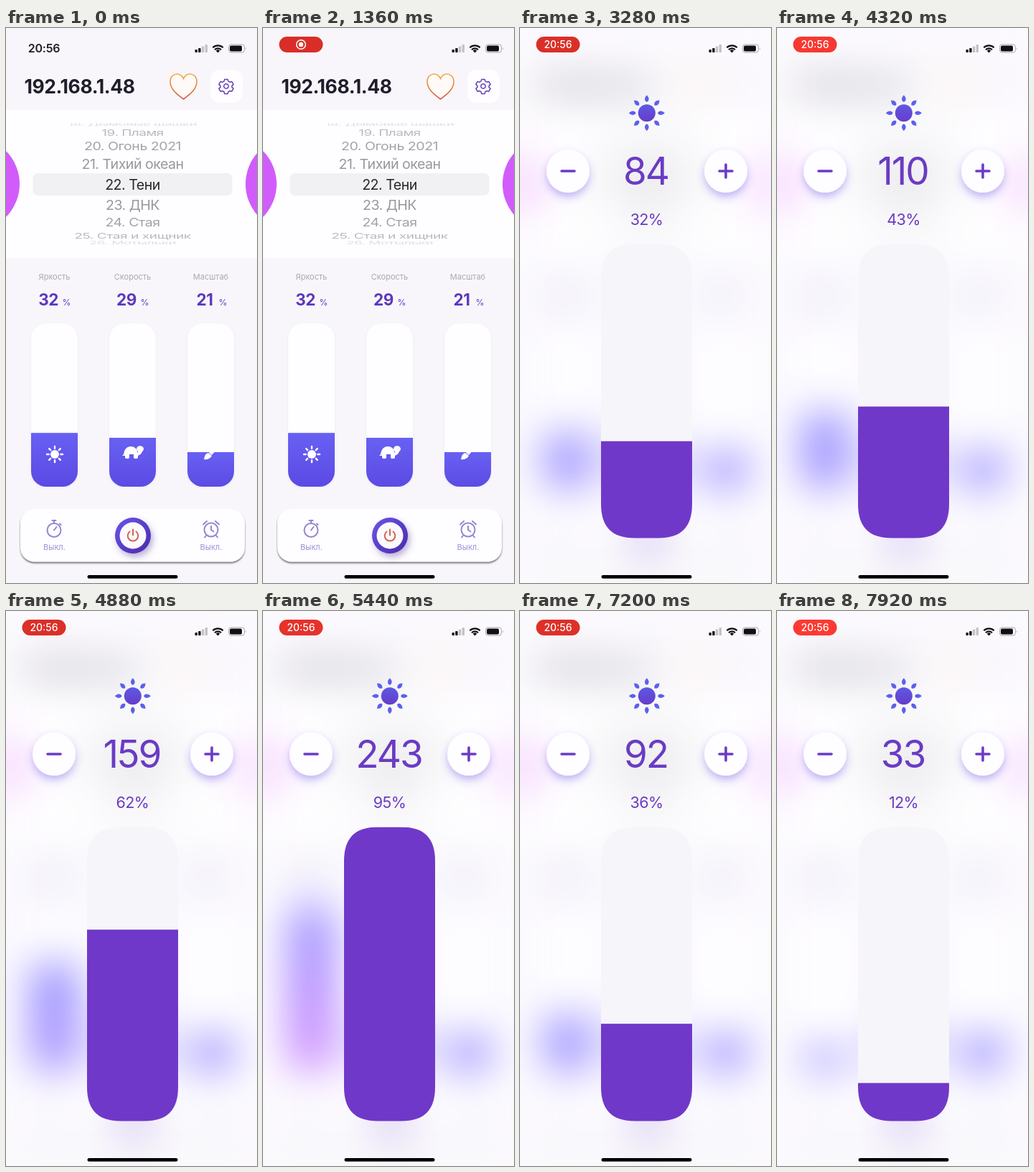
Write an HTML page that moves like this. It is 350 px wide and 772 px high and loops after 8 s.

```html
<!DOCTYPE html>
<html lang="ru">
<head>
<meta charset="utf-8">
<title>Lamp remote</title>
<style>
html, body { margin: 0; width: 100%; height: 100%; overflow: hidden; background: #f9f7fc; }
#stage { position: relative; width: 350px; height: 772px; overflow: hidden; }
#stage > * { position: absolute; left: 0; top: 0; width: 350px; height: 772px; }
svg { display: block; overflow: hidden; }
text { font-family: Inter, Roboto, "Open Sans", sans-serif; text-anchor: middle; }
#veil { background: #fff; }
#panel { transform-origin: 176.5px 386px; }
</style>
</head>
<body>
<div id="stage">
  <svg id="main" viewBox="0 0 350 772"></svg>
  <div id="veil"></div>
  <svg id="panel" viewBox="0 0 350 772"></svg>
  <svg id="status" viewBox="0 0 350 772"></svg>
</div>
<script>
const $ = id => document.getElementById(id);
const clamp = x => Math.max(0, Math.min(1, x));
const LOOP = 8000, OPEN = 2200, OPEN_MS = 560, LAG = 60;

const text = (x, y, size, fill, str, extra = '') =>
  `<text x="${x}" y="${y}" font-size="${size}" fill="${fill}" ${extra}>${str}</text>`;
const ring = (n, shape) =>
  Array.from({ length: n }, (_, i) => `<g transform="rotate(${i * 360 / n})">${shape}</g>`).join('');

// y, vertical squash, horizontal scale, colour, label
const rows = [
  [134, .3, .96, '#dedde0', '18. Дымовые шашки'],
  [145.5, .62, .97, '#b9b8bc', '19. Пламя'],
  [164, .84, 1, '#a3a2a6', '20. Огонь 2021'],
  [189, .95, 1, '#98979b', '21. Тихий океан'],
  [217.5, 1, 1, '#29282c', '22. Тени'],
  [246, .95, 1, '#98979b', '23. ДНК'],
  [270.5, .84, 1, '#a3a2a6', '24. Стая'],
  [289, .56, .98, '#b9b8bc', '25. Стая и хищник'],
  [299, .3, .96, '#dedde0', '26. Мотыльки']
];
const wheel = rows.map(([y, sy, sx, fill, label]) =>
  `<g transform="translate(176.5 ${y}) scale(${sx} ${sy})">${text(0, 7, 19.6, fill, label, 'letter-spacing="-.5"')}</g>`).join('');

const sunIcon = `<g transform="translate(68 593)" fill="#fff"><circle r="6"/>
  ${ring(8, '<path d="M0-8.3V-11" stroke="#fff" stroke-width="2.4" stroke-linecap="round"/>')}</g>`;
const turtleIcon = `<g transform="translate(177 590)" fill="#fff">
  <path d="M-13 4q1-12 10.500-12q8 0 9.500 11h-19z"/>
  <ellipse cx="10" cy="-4.500" rx="5" ry="4.300"/><path d="M4 3q3-1 4-7l5 3q-2 6-9 6z"/>
  <rect x="-11" y="2" width="6" height="7" rx="2"/><rect x="1" y="2" width="6" height="7" rx="2"/>
  <path d="M-12 2l-3 3 5 0z"/></g>`;
const brushIcon = `<path fill="#fff" d="M276 600q1-8 6-9l5 4q-3 6-11 5zM283 591l8-9 4 3-8 9z"/>`;

const sliders = [
  [35, 'Яркость', 32, 563, sunIcon],
  [144, 'Скорость', 29, 570, turtleIcon],
  [253, 'Масштаб', 21, 590, brushIcon]
].map(([x, label, val, top, icon], i) => `
  ${text(x + 32.5, 350, 11, '#aaa7af', label)}
  ${text(x + 24, 386, 22.5, '#5d37bb', val, 'font-weight="700" letter-spacing="-.5"')}
  ${text(x + 49.5, 386, 12, '#6f4cc4', '%', 'font-weight="500"')}
  <rect x="${x}" y="411" width="65" height="227" rx="21" fill="#fefdff" filter="url(#soft)"/>
  <clipPath id="tube${i}"><rect x="${x}" y="411" width="65" height="227" rx="21"/></clipPath>
  <clipPath id="lit${i}"><rect id="litRect${i}" x="${x}" y="${top}" width="65" height="300"/></clipPath>
  <g clip-path="url(#tube${i})">
    <rect id="fill${i}" x="${x}" y="${top}" width="65" height="${638 - top}" fill="url(#bar${i ? '' : '0'})"/>
    <g clip-path="url(#lit${i})">${icon}</g>
  </g>`).join('');

const barStops = id => `<linearGradient id="${id}" x2="0" y2="1">
  <stop stop-color="#6860f3"/><stop id="${id}End" offset="1" stop-color="#5c4be3"/></linearGradient>`;

const gear = `<g transform="translate(307 81)" fill="none" stroke="#6440b8" stroke-width="1.500" stroke-linejoin="round">
  <path d="M-2.200-9h4.400l.8 2.700 2.200 1.200 2.700-.7 2.200 3.800-2 2v2l0 0 2 2-2.200 3.800-2.700-.7-2.200 1.200-.8 2.700h-4.400l-.8-2.700-2.200-1.200-2.700.7-2.200-3.800 2-2v-2l-2-2 2.200-3.800 2.700.7 2.200-1.200z" transform="translate(0 -.6)"/>
  <circle r="3.200"/></g>`;

$('main').innerHTML = `
<defs>
  ${barStops('bar')}${barStops('bar0')}
  <linearGradient id="love" x2="0" y2="1"><stop stop-color="#f0b04a"/><stop offset="1" stop-color="#cf5a3c"/></linearGradient>
  <linearGradient id="knob" x2="1" y2="1"><stop stop-color="#6a55ea"/><stop offset="1" stop-color="#4a2aa8"/></linearGradient>
  <filter id="soft" x="-20%" y="-20%" width="140%" height="140%"><feDropShadow dx="0" dy="1" stdDeviation="1.500" flood-color="#8070a0" flood-opacity=".12"/></filter>
  <filter id="lift" x="-20%" y="-30%" width="140%" height="170%"><feDropShadow dx="0" dy="2" stdDeviation="1" flood-color="#444" flood-opacity=".75"/></filter>
  <filter id="drop" x="-50%" y="-50%" width="200%" height="200%"><feDropShadow dx="3" dy="5" stdDeviation="4" flood-color="#5a45a0" flood-opacity=".4"/></filter>
  <clipPath id="drum"><rect x="20" y="132.500" width="310" height="168.500"/></clipPath>
</defs>
<rect width="350" height="772" fill="#f8f6fb"/>
<rect y="114" width="350" height="206" fill="#fefdff"/>
${text(102.5, 91, 26.5, '#201d2b', '192.168.1.48', 'font-weight="700" letter-spacing="-.4"')}
<path d="M247.500 99C240 93 229 86 229 74.500C229 67.500 234 64 238.500 64C243 64 246 67 247.500 70.500C249 67 252 64 256.500 64C261 64 266 67.500 266 74.500C266 86 255 93 247.500 99Z" fill="#fffaf8" stroke="url(#love)" stroke-width="1.600"/>
<rect x="285" y="58" width="45" height="46" rx="13" fill="#fefdff"/>${gear}
<g fill="#d15cfb"><circle cx="-46" cy="217" r="65"/><circle cx="399" cy="217" r="65"/></g>
<rect x="37.500" y="202" width="278" height="31" rx="7" fill="#f1f0f3"/>
<g clip-path="url(#drum)">${wheel}</g>
${sliders}
<rect x="20" y="669" width="313" height="73.500" rx="20" fill="#fefdff" filter="url(#lift)"/>
<g fill="none" stroke="#9785d2" stroke-width="2" stroke-linecap="round">
  <g transform="translate(67 698.500)"><circle r="9.500"/><path d="M-2.500-13.500h5M0-13v3M8-9l1.500 1.500M0 0l3.500-4.500"/></g>
  <g transform="translate(286 698)"><circle r="9.500"/><path d="M-11-7.500l5-4.500M11-7.500l-5-4.500M0-5v5l3.500 2.500M-7 8l-2 2.500M7 8l2 2.500"/></g>
</g>
${text(67.5, 726, 11, '#a391d6', 'Выкл.')}${text(286, 726, 11, '#a391d6', 'Выкл.')}
<circle cx="177" cy="706" r="25" fill="url(#knob)" filter="url(#drop)"/>
<circle cx="177" cy="706" r="18.500" fill="#fcf9fd"/>
<path d="M172.500 700.500a7.300 7.300 0 1 0 9 0M177 697.500v8" fill="none" stroke="#cd6653" stroke-width="2" stroke-linecap="round"/>`;

const button = (x, sign) => `<circle cx="${x}" cy="199" r="30" fill="#fefdff" filter="url(#glow)"/>
  <path d="${sign}" transform="translate(${x} 199)" stroke="#6c3bc6" stroke-width="3.600" stroke-linecap="round"/>`;

$('panel').innerHTML = `
<defs>
  <linearGradient id="ray" gradientUnits="userSpaceOnUse" x1="0" y1="-25" x2="0" y2="25"><stop stop-color="#5a66f2"/><stop offset="1" stop-color="#6a2fbb"/></linearGradient>
  <filter id="glow" x="-60%" y="-60%" width="220%" height="220%"><feDropShadow dx="0" dy="6" stdDeviation="6" flood-color="#5a3ee0" flood-opacity=".36"/></filter>
  <radialGradient id="haze"><stop stop-color="#eeedf0" stop-opacity=".6"/><stop offset="1" stop-color="#f6f5f8" stop-opacity="0"/></radialGradient>
  <clipPath id="card"><path d="M113 348C113 316 128 300.500 160 300.500H193C225 300.500 240 316 240 348V662C240 694 225 709.500 193 709.500H160C128 709.500 113 694 113 662Z"/></clipPath>
</defs>
<ellipse cx="176.500" cy="210" rx="75" ry="75" fill="url(#haze)"/>
<g transform="translate(176.800 118.300)" fill="url(#ray)"><circle r="12"/>
  ${ring(8, '<path d="M0-25C1.800-23 2.800-21.500 2.800-19.500C2.800-17.500 1.500-15.800 0-15.300C-1.500-15.800-2.800-17.500-2.800-19.500C-2.800-21.500-1.800-23 0-25Z"/>')}</g>
${button(67, 'M-9 0H9')}${button(287, 'M-9 0H9M0-9V9')}
<text id="num" x="175.500" y="218" font-size="53" font-weight="400" fill="#6a3bc4" letter-spacing="-2"></text>
<text id="pct" x="176.500" y="273.500" font-size="21.500" fill="#6a3bc4" letter-spacing="-.6"></text>
<g clip-path="url(#card)"><rect x="113" y="300" width="127" height="410" fill="#f6f5f9"/>
  <rect id="level" x="113" width="127" height="420" fill="#7038c8"/></g>`;

const bars = [4, 6, 8.5, 11].map((h, i) =>
  `<rect x="${263.5 + i * 4.7}" y="${34 - h}" width="3.400" height="${h}" rx=".8" fill="${i < 2 ? '#111' : '#c3c2c6'}"/>`).join('');

$('status').innerHTML = `
${bars}
<g fill="none" stroke="#111" stroke-width="2.200"><path d="M288.300 27.300a10.500 10.500 0 0 1 14.400 0M291 30.200a6.600 6.600 0 0 1 9 0"/></g>
<path d="M295.500 34.500l-2.800-2.900a4 4 0 0 1 5.600 0z" fill="#111"/>
<rect x="310.500" y="23" width="22" height="11" rx="3.300" fill="none" stroke="#a5a4a8"/>
<rect x="312" y="24.500" width="17" height="8" rx="2" fill="#111"/>
<path d="M334 26.800q1.800 1.700 0 3.600z" fill="#a5a4a8"/>
<g id="clock">${text(53, 34, 16, '#211f26', '20:56', 'font-weight="600" letter-spacing="-.2"')}</g>
<g id="pill"><rect id="pillBg" x="22.500" y="12" width="61" height="22" rx="11"/>
  <g id="rec"><circle cx="53" cy="23" r="6.300" fill="none" stroke="#fff" stroke-width="1.500"/><circle cx="53" cy="23" r="3.200" fill="#fff"/></g>
  <g id="pillTime">${text(53, 28, 14, '#fff', '20:56', 'font-weight="500"')}</g></g>
<rect x="113.500" y="761" width="126" height="4.800" rx="2.400" fill="#000"/>`;

// time, brightness, slope per second
const drag = [[3600, 84, 0], [4320, 114, 67], [5440, 255, 200], [5440, 255, 0], [5800, 255, 0], [6640, 148, -67], [7820, 33, 0]];
function brightness(t) {
  if (t <= drag[0][0]) return drag[0][1];
  for (let i = 1; i < drag.length; i++) {
    const [a, p, m] = drag[i - 1], [b, q, n] = drag[i];
    if (t >= b || b === a) continue;
    const u = (t - a) / (b - a), d = (b - a) / 1000, w = 1 - u;
    return p * w * w * (1 + 2 * u) + m * d * u * w * w + q * u * u * (3 - 2 * u) - n * d * u * u * w;
  }
  return 33;
}

function draw(t) {
  const v = brightness(t), shown = Math.round(brightness(t - LAG));
  const u = clamp((t - OPEN) / OPEN_MS), e = 1 - Math.pow(1 - u, 2.3);

  $('main').style.filter = u ? `blur(${28 * u}px) saturate(${1 + .25 * u})` : 'none';
  $('veil').style.opacity = .35 * u;
  $('panel').style.opacity = e;
  $('panel').style.transform = `scale(${.675 + .325 * e})`;

  const top = 638 - 227 * v / 255;
  $('fill0').setAttribute('y', top);
  $('fill0').setAttribute('height', 638 - top);
  $('litRect0').setAttribute('y', top);
  $('bar0End').setAttribute('stop-color', `hsl(${247 + 28 * clamp((v - 150) / 105)} 74% 59%)`);
  $('level').setAttribute('y', 709.5 - 409 * v / 255);
  $('num').textContent = shown;
  $('pct').textContent = Math.floor(shown / 2.55) + '%';

  const on = clamp((t - 300) / 200), swap = clamp((t - 3000) / 200);
  const glow = .5 + .5 * Math.cos((t - 7900) / 1900 * 2 * Math.PI);
  $('clock').style.opacity = 1 - on;
  $('pill').style.opacity = on;
  $('rec').style.opacity = 1 - swap;
  $('pillTime').style.opacity = swap;
  $('pillBg').setAttribute('fill', `rgb(${216 + 36 * glow},${46 + 12 * glow},${39 + 11 * glow})`);
}

const start = performance.now();
function tick(now) {
  draw(Math.max(0, now - start) % LOOP);
  requestAnimationFrame(tick);
}
draw(0);
requestAnimationFrame(tick);
</script>
</body>
</html>
```
